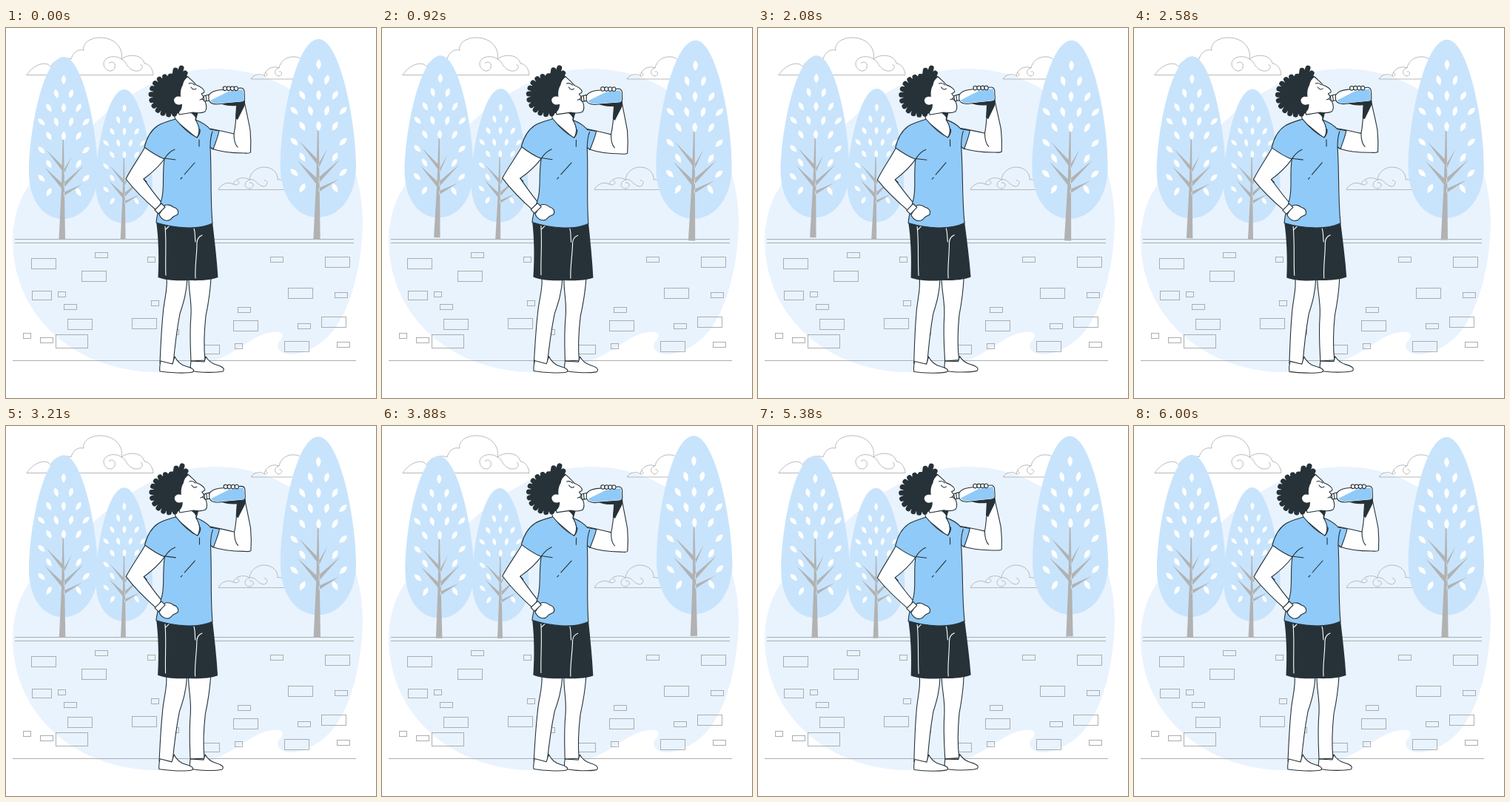
Write an HTML page that moves like this. It is 500 px wide and 500 px high and loops after 6040 ms.

```html
<!DOCTYPE html>
<html lang="en">
<head>
<meta charset="utf-8">
<title>Drinking water in the park</title>
<style>
  html, body { margin: 0; width: 100%; height: 100%; overflow: hidden; background: #fff; }
  svg { display: block; width: 100vw; height: 100vh; }
  .thin { fill: none; stroke: #a2a6a9; stroke-width: .9; }
  .cloud { fill: none; stroke: #b0b2b4; stroke-width: .9; }
  .skin, .line, .shirt { stroke: #263238; stroke-width: 1.1; stroke-linejoin: round; stroke-linecap: round; }
  .skin { fill: #fff; }
  .line { fill: none; }
  .shirt { fill: #90caf9; }
  .dark { fill: #263238; }
  .seam { fill: none; stroke: #fff; stroke-width: 1.1; stroke-linecap: round; }
</style>
</head>
<body>
<svg viewBox="0 0 500 500">
  <defs>
    <path id="leaf" fill="#fff" d="M0-6.5Q6-1 0 6.5Q-6-1 0-6.5"/>
    <g id="tree">
      <path fill="#c8e4fc" d="M0 0C26 0 46 101 46 156C46 193 26 219 -1 219C-28 219 -47 193 -47 156C-47 101 -28 0 0 0Z"/>
      <g id="leaves"></g>
      <path fill="#b2b2b2" d="M-1.500 112H0L2 246H-6.500L-3 175Z
        M-24 125L-2 147V154Z M-26 149L-2 171V179Z
        M11 134L0 153V159Z M27 147L0 170V177Z M25 172L0 183V188Z"/>
    </g>
  </defs>

  <path fill="#e9f3fe" d="M9 285C10 255 18 230 34 208C60 180 80 172 98 150C132 116 195 55 283 55C390 55 482 140 482 262C481 330 462 395 430 422C415 434 395 442 383 441C368 440 363 429 371 422C378 414 372 410 360 411C335 414 318 434 290 446C265 458 235 465 205 465C100 465 9 395 9 285Z"/>

  <g class="cloud">
    <path d="M28 63.500H199C198 54 193 48 187 48C185 36 166 34 156 42C159 26 146 13 127 13C112 13 103 22 105 30C96 28 90 34 88 42C76 38 62 45 61 53C55 44 38 48 28 63.500M156 42C148 36 133 38 132 48C132 57 143 62 147 54C149 46 142 44 139 48M156 42C163 44 162 55 174 58C183 59 187 53 182 49"/>
    <path d="M331 69H400M331 69C335 62 344 61 349 65C350 56 360 50 369 54C371 44 380 38 390 39C397 39 402 44 402 50M349 65C354 66 354 61 350 60M369 54C363 55 361 63 368 65C374 65 374 58 369 59"/>
    <path d="M287 218.500H380M287 218.500C290 211 300 207 307 211C310 203 321 200 329 205C330 195 339 188 349 188C360 188 368 196 367 205C373 203 379 209 380 218M307 211C314 214 318 208 312 206M329 205C321 208 321 216 329 217C336 216 336 208 329 209M329 205C338 203 339 213 348 214C355 213 354 205 349 206"/>
  </g>

  <g class="thin">
    <path d="M12 285.500H470M12 290.500H470M9 449.500H473"/>
    <g id="bricks"></g>
  </g>

  <g id="trees">
    <use href="#tree" transform="translate(160 83) scale(.825)"/>
    <use href="#tree" transform="translate(78 39)"/>
    <use href="#tree" transform="translate(422.500 15) scale(1.1)"/>
  </g>

  <g id="man">
    <!-- legs and shoes -->
    <path class="skin" d="M247 338C247 358 251 368 250 388C248 412 249 428 250 450L269 449C267 430 268 408 270 389C274 370 276 356 277 338Z"/>
    <path class="skin" d="M250 450C249 455 249 459 250 463C262 466 284 466 293 464C297 460 291 457 284 455C277 453 273 449 270 444L268 451Z"/>
    <path class="skin" d="M217 338C219 353 213 369 212 388C210 407 209 430 208 453L226 454C228 432 231 407 235 386C240 371 244 358 245 338Z"/>
    <path class="skin" d="M209 450C208 455 207 460 208 464C221 466 243 467 252 465C257 462 250 459 243 457C236 455 231 450 228 444L225 454Z"/>

    <!-- shorts -->
    <path class="dark" d="M203 261C225 269 256 273 279 262C282 288 285 313 286.500 337C276 341 261 341.500 247 341C231 342 216 341 205.500 337C207 310 206 283 203 261Z"/>
    <path class="seam" d="M215 268C217 290 215 313 216 334M216 272L221 267M254 271C256 277 255 283 256 289M265 280C260 282 258 285 258 291C258 307 255 323 256 338"/>

    <!-- raised arm -->
    <path class="skin" d="M276 136C291 139 300 141 308 143C310 134 311 122 312 106L322 99C325 114 328 127 330 138C331 149 331 160 330.500 168C329 170 325 169 321 169C306 169 292 168 278 163Z"/>
    <path class="line" d="M308 143C308 152 309 157 313 161"/>
    <path class="dark" d="M290 102L322 96Q324 101 322 106L313 124L310 122L311 105Q298 106 290 102Z"/>

    <!-- bent arm -->
    <path class="skin" d="M190 157C181 174 170 188 162 204C175 221 190 235 205 248L213 239C203 228 194 215 186 204C197 196 206 188 214 177Z"/>
    <path class="line" d="M186 204L190 208"/>

    <!-- neck and shirt -->
    <path class="skin" d="M227 115L229 125L258 149C263 140 261 130 256 123L259 113Z"/>
    <path class="dark" d="M248 114L260 112L257 124Q255 117 248 114Z"/>
    <path class="shirt" d="M229 123C237 133 247 143 258 148C264 142 261 132 256 124C264 127 271 131 276 137L288 139C286 149 282 157 280 164L276 161C278 200 276 232 279 264C258 274 226 270 203 263C204 249 209 239 211 228C214 214 211 198 214 177C204 173 195 167 187 161C190 149 196 138 205 132C211 128 219 126 229 123Z"/>
    <path class="line" d="M258 148C262 143 263 140 262 137M261 151V160M276 161C276 151 277 145 279 140M214 177C217 172 221 167 228 164M214 176L229 178M236 204L238 202M241 198L255 182"/>

    <!-- fist on the hip -->
    <path class="skin" d="M207 252L214 240C217 238 223 239 226 242C231 243 234 247 232 252L226 255L222 259C216 262 210 259 207 252Z"/>
    <path class="skin" d="M201 246L210 237L215 242L206 251Z"/>

    <!-- head -->
    <path class="skin" d="M227 78C230 67 239 63 246 66C250 70 254 73 257 77C263 79 268 83 268 86C268 88 265 88 264 89L267 93L265 96L269 99C271 104 272 109 269 113C265 115 258 115 253 114L234 117Z"/>
    <path class="line" d="M250 80C252 83 254 84 257 82M247 75C250 74 253 75 255 77M265 96L262 97"/>
    <path class="dark" d="M246 66Q240 70 239 77Q235 83 236 93L238 104Q238 112 230 117L212 114L199 102L199 80L211 68L236 56Z"/>
    <path id="hair" fill="none" stroke="#263238" stroke-width="7" stroke-linecap="round"/>
    <path fill="#fff" d="M238 94C233 91 227 93 227 98C228 104 234 105 239 102L242 96Z"/>

    <!-- bottle and fingers -->
    <path class="skin" d="M267 92L274 90L275 98L268 99ZM270 91L271 99"/>
    <path class="skin" d="M274 91C277 86 282 85 287 84L317 81Q321 81 322 85L322.500 96Q322 100 318 100L285 103C279 103 275 101 274 97Z"/>
    <path fill="#90caf9" d="M276 98L300 86L320 83Q321.500 90 321.500 96Q321 99 318 99L285 102Q279 102 276 98Z"/>
    <g id="fingers"></g>
  </g>
</svg>
<script>
const get = id => document.getElementById(id);
const points = text => text.split(" ").map(p => p.split(","));

function layBricks(w, h, corners) {
  get("bricks").innerHTML += points(corners).map(([x, y]) =>
    `<rect x="${x}.5" y="${y}.5" width="${w}" height="${h}"/>`).join("");
}
layBricks(43, 18, "67,414");
layBricks(33, 14, "34,311 102,328 170,392 431,309 381,351 426,390 376,423 307,395 83,393");
layBricks(26, 12, "35,355 262,428");
layBricks(17, 7, "120,303 78,373 357,309 444,357 313,377 394,399 447,424 216,407 46,418");
layBricks(10, 7, "191,309 196,368 309,426 70,356 23,412");

// Staggered rows of leaves, kept inside the crown and clear of the trunk.
let leaves = "";
for (let row = 0; row < 9; row++) {
  const y = 31 + 19 * row;
  for (let x = -10 * row; x <= 10 * row; x += 20) {
    if (Math.abs(x) > 38 || row > 4 && Math.abs(x) < 15) continue;
    const lean = x * (y > 165 ? -1.5 : 1.5);
    leaves += `<use href="#leaf" transform="translate(${x} ${y}) rotate(${lean})"/>`;
  }
}
get("leaves").innerHTML = leaves;

// Curls fan out around the back of the head, with a tuft in front.
let locks = "M226 80L229 57M230 78L237 54M232 74L242 61";
for (let a = 75; a <= 290; a += 18) {
  const r = a * Math.PI / 180;
  locks += `M221 89L${221 + 25 * Math.cos(r)} ${91 + 26 * Math.sin(r)}`;
}
get("hair").setAttribute("d", locks);

for (let x = 296; x < 315; x += 5) {
  get("fingers").innerHTML +=
    `<rect class="skin" x="${x - 2.5}" y="79" width="5" height="5.5" rx="2.4" transform="rotate(-15 ${x} 82)"/>`;
}

// Linear swing 0, 1, -1, 0 over one period.
function swing(t, period) {
  const p = t / period % 1;
  return p < .25 ? 4 * p : p < .75 ? 2 - 4 * p : 4 * p - 4;
}

function turn(id, angle, x, y) {
  get(id).setAttribute("transform", `rotate(${angle} ${x} ${y})`);
}

const start = performance.now();
function draw(now) {
  const t = Math.max(0, now - start) % 6040;
  turn("trees", swing(t, 6000), 252, 150);
  turn("man", swing(t, 3000), 246, 257);
  requestAnimationFrame(draw);
}
draw(start);
</script>
</body>
</html>
```
